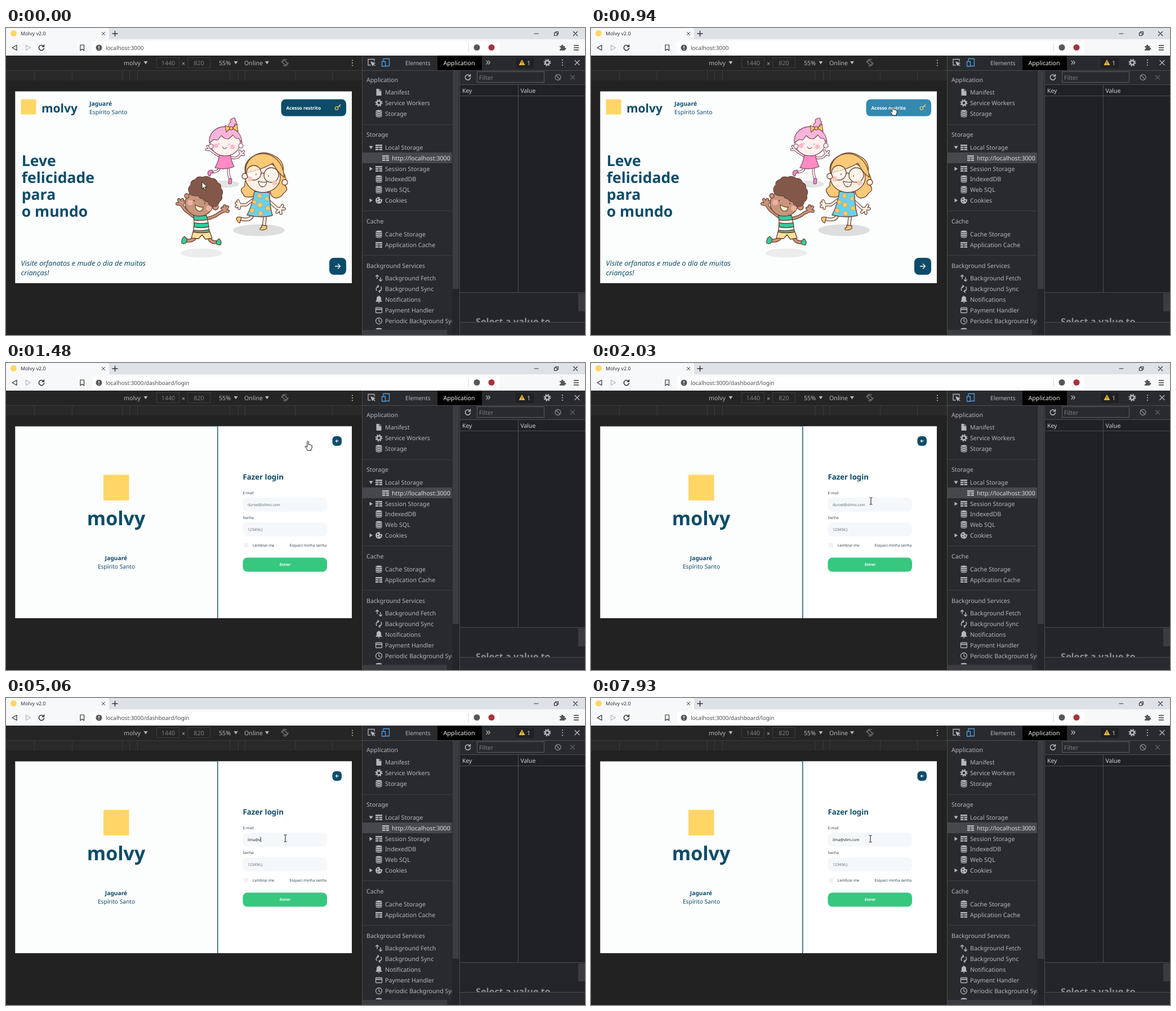
Recreate the animation shown at these times as an HTML page. Size 1028x545 px, loop 8000 ms.

```html
<!DOCTYPE html>
<html lang="pt">
<head>
<meta charset="utf-8">
<title>Login demo</title>
<style>
html, body { margin: 0; width: 100%; height: 100%; overflow: hidden; background: #222; }
svg { display: block; }
text { font: 10.65px "Noto Sans", "Open Sans", sans-serif; text-rendering: geometricPrecision; white-space: pre; }
.line { fill: none; stroke-linecap: round; stroke-linejoin: round; }
.light { fill: #b4b7bb; }
.navy { fill: #0d4c69; }
.bold { font-weight: 700; }
.brand { font-weight: 800; }
.small { font-size: 6.63px; }
.mid { text-anchor: middle; }
.ink { stroke: #6b432f; stroke-width: 1.3; stroke-linejoin: round; stroke-linecap: round; }
.plum { stroke: #75405a; stroke-width: 1.1; stroke-linejoin: round; stroke-linecap: round; }
</style>
</head>
<body>
<svg width="1028" height="545" viewBox="0 0 1028 545">
<defs>
  <g id="file"><path d="M-4.5-6H1L4.5-2.5V6h-9z"/><path d="M1-6v3.5h3.5" fill="none" stroke="#292a2d"/></g>
  <g id="gear" class="line" stroke="#b4b7bb"><circle r="3.5" stroke-width="2.6"/><circle r="5.5" stroke-width="2" stroke-dasharray="2.2 2.12" stroke-linecap="butt"/></g>
  <g id="disks"><path d="M-5.5-4.5a5.5 2 0 0 1 11 0v9a5.5 2 0 0 1-11 0z"/><path d="M-5.5-3.5q5.5 3 11 0m-11 3.5q5.5 3 11 0m-11 3.5q5.5 3 11 0" fill="none" stroke="#292a2d"/></g>
  <path id="grid" d="M-6-5H6v2.6H-6zM-6-1.3h5.4v2.6H-6zM.6-1.3H6v2.6H.6zM-6 2.4h5.4V5H-6zM.6 2.4H6V5H.6z"/>
  <g id="cookie"><circle r="6"/><g fill="#292a2d"><circle cx="-2" cy="-2" r="1.2"/><circle cx="2.5" cy="1" r="1.2"/><circle cx="-2" cy="2.5" r="1"/><circle cx="4" cy="-4.5" r="2.5"/></g></g>
  <path id="fetch" class="line" stroke="#b4b7bb" stroke-width="1.4" d="M-3 1v-6.5m-2.5 2.5 2.5-2.5 2.5 2.5M3-1v6.5M.5 3 3 5.5 5.5 3"/>
  <path id="sync" class="line" stroke="#b4b7bb" stroke-width="1.5" d="M-4 3a5 5 0 0 1 3.5-7.5M-2-6.5l2 2-2 2M4-3a5 5 0 0 1-3.5 7.5M2 6.5l-2-2 2-2"/>
  <path id="bell" d="M-5.5 4v-1l1.5-1.5v-3.5q0-3 3-3.7a1 1 0 0 1 2 0q3 .7 3 3.7v3.5L5.5 3v1zM-1.5 4.8h3a1.5 1.5 0 0 1-3 0z"/>
  <g id="card"><rect x="-5.5" y="-4.5" width="11" height="9" rx="1" fill="none" stroke="#b4b7bb" stroke-width="1.3"/><path d="M-5.5-2.5h11v2h-11z"/></g>
  <path id="clock" class="line" stroke="#b4b7bb" stroke-width="1.3" d="M-5.5 0a5.5 5.5 0 1 1 11 0a5.5 5.5 0 1 1-11 0M0-3v3.3l2.5 1.5"/>
  <path id="reload" class="line" stroke-width="1.5" d="M3.8-2.5a4.6 4.6 0 1 0 .7 3.5M4.5-5v3.2H1.3"/>
  <path id="close" class="line" stroke-width="1.2" d="M-3.5-3.5l7 7m0-7l-7 7"/>
  <path id="down" d="M-3.5-2.5h7L0 3z"/>
  <path id="dots" class="line" stroke="#b4b7bb" stroke-width="2.2" d="M0-4.5v0m0 4.5v0m0 4.5v0"/>
  <path id="bowLimbs" class="line" d="M380 228l-10-6-8-6m-6 0 6 0-4-6m4 6 1-6M399 230q9 2 13-1l5-5m-2-6 2 6 5-5m-5 5 5 1"/>
  <path id="glassesLimbs" class="line" d="M440 304l-14 10-11 0m-6-3 6 3-3-7m3 7-6 3m6-3-1 6M468 308l13 12 6 1m4-6-4 6 7 0m-7 0 1 8m-1-8-6 6"/>
  <path id="boyLimbs" class="line" d="M335 336l-17-13-7-10m-7-1 7 1-4-8m4 8 2-8m-2 8 5-4M358 338q12-2 20-9l10-5m6 1-6-1 5-6m-5 6 0-8m0 8-4-4"/>
  <clipPath id="sideClip"><path d="M633 75h159v460H633z"/></clipPath>
  <clipPath id="noteClip"><path d="M806 470h210v52H806z"/></clipPath>
</defs>

<!-- browser -->
<path fill="#dee1e6" d="M0 0h1028v21H0z"/>
<path fill="#f7f8f9" d="M0 21V4q0-4 4-4H179q4 0 4 4V20H1028V49H0z"/>
<path fill="#fff" d="M153 24H876V46H153z"/>
<circle cx="13.5" cy="9.5" r="5.5" fill="#ffd666"/>
<text x="26" y="13" style="font-size:9px" fill="#333">Molvy v2.0</text>
<g class="line" stroke="#333" stroke-width="1.2">
  <use href="#close" transform="translate(173 10) scale(.8)"/>
  <path stroke-width="1.5" d="M189 10h9m-4.5-4.5v9"/>
  <path d="M938 10h7M973.5 8.5h5v5h-5zM975.5 8.5v-2h5v5h-2"/>
  <use href="#close" x="1011" y="10"/>
  <path d="M19 30.5v9L11 35z"/><path stroke="#b5b7ba" d="M35.500 30.500v9L43.500 35z"/>
  <use href="#reload" x="63" y="35"/>
  <path d="M132 30h6.500v10l-3.200-2.500L132 40z"/>
  <path stroke="#d5d7da" d="M821 27v15"/>
  <path d="M1008.500 31h8m-8 4h8m-8 4h8" stroke-width="1.4"/>
</g>
<circle cx="165" cy="35" r="5.500" fill="#55585c"/>
<path stroke="#fff" stroke-width="1.400" d="M165 31.700v4m0 1.200v1.400"/>
<text id="address" x="177" y="38.500" style="font-size:9.95px" fill="#484b50"></text>
<circle cx="836" cy="34.500" r="5.500" fill="#54575c"/>
<circle cx="862" cy="34.500" r="5.500" fill="#a5343c"/>
<path fill="#55585c" d="M983 32h3a1.800 1.800 0 1 1 3.400 0h2.600v3a1.800 1.800 0 1 1 0 3.400V40h-9v-2.500a1.700 1.700 0 1 0 0-3.300z"/>

<!-- device toolbar -->
<path fill="#222" d="M0 49h632v496H0z"/>
<path fill="#252525" d="M0 49h632v26H0z"/>
<path fill="#292929" d="M0 75h632v18H0z"/>
<path fill="none" stroke="#3b3b3b" d="M0 75.500h632M50.500 76v17M117.500 76v17M206.500 76v17M219.500 76v17M233.500 76v17M397.500 76v17M412.500 76v17M424.500 76v17M513.500 76v17M579.500 76v17M267.500 52.500h40v18h-40zM322.500 52.500h40v18h-40z"/>
<g class="light">
  <text x="209" y="65.500">molvy</text><use href="#down" x="248" y="61.500"/>
  <text x="288" y="65.500" class="mid" opacity=".6">1440</text>
  <text x="315" y="67" class="mid">×</text>
  <text x="342.500" y="65.500" class="mid" opacity=".6">820</text>
  <text x="378" y="65.500">55%</text><use href="#down" x="408" y="61.500"/>
  <text x="423" y="65.500">Online</text><use href="#down" x="463.500" y="61.500"/>
</g>
<g class="line" stroke="#8d9095"><circle cx="495" cy="61.500" r="6" stroke-dasharray="12 6.850"/><rect x="492.500" y="57.500" width="5" height="8" rx="1" transform="rotate(-45 495 61.500)"/></g>
<use href="#dots" x="615" y="62"/>

<!-- developer tools -->
<path fill="#292a2d" d="M632 49h396v496H632z"/>
<path fill="#202124" d="M806 101h222v369H806z"/>
<path fill="#242528" d="M806 470h222v52H806z"/>
<path fill="#000" d="M766 49h79v26h-79z"/>
<path fill="#242528" d="M792 75h13v470h-13z"/>
<path fill="#3b3c3f" d="M793 76h11v387h-11zM633 536h150v9H633zM1016 471h12v32h-12z"/>
<path fill="none" stroke="#494c50" d="M632.500 49v496M633 75.500h395M805.500 75v470M806 100.500h222M806 120.500h222M909.500 101v369M806 469.500h222M806 522.500h222"/>
<path fill="none" stroke="#5b5d61" d="M836.500 77.500h119v19h-119z"/>
<path fill="none" stroke="#3c3e42" d="M633 171.500h159m-159 153h159m-159 79h159"/>
<path fill="#47484b" d="M633 221h159v19H633z"/>
<g class="light">
  <text x="709" y="65.500" style="font-size:10.3px">Elements</text>
  <text x="776.500" y="65.500" style="fill:#eee">Application</text>
  <text x="851.500" y="66" style="font-size:18px">»</text>
  <text x="840" y="92" opacity=".6">Filter</text>
  <text x="810" y="115" style="font-size:10.4px;fill:#d0d3d6">Key</text>
  <text x="913.500" y="115" style="font-size:10.4px;fill:#d0d3d6">Value</text>
  <text x="834" y="527" class="bold" clip-path="url(#noteClip)" style="font-size:16.3px;fill:#8b8e92">Select a value to</text>
</g>
<rect x="905" y="53" width="32" height="18" rx="2" fill="#202124"/>
<path fill="#f5bd38" d="M916 56l5.500 10h-11z"/><path stroke="#222" d="M916 59.500v3.500m0 1v1"/>
<text x="925" y="65.500" fill="#ccc">1</text>
<use href="#gear" x="961" y="61.500"/><use href="#dots" x="988" y="61.500"/>
<g class="line" stroke="#b4b7bb" stroke-width="1.300">
  <use href="#close" transform="translate(1014 61.500) scale(1.150)"/>
  <path d="M647 66h-4V55.500h11V59"/><path fill="#b4b7bb" d="M648 60l7 2.500-3 1.200-1.200 3zM652 64l3 3"/>
  <g stroke="#4f9fe8"><path d="M670 58v-3.500h10.500v13H674"/><rect x="667.500" y="59.500" width="6" height="8.500"/></g>
  <use href="#reload" x="820" y="87.500"/>
  <g stroke="#85888c"><circle cx="980" cy="87.500" r="5"/><path d="M976.500 84l7 7"/></g>
  <use href="#close" x="1006" y="87.500" stroke="#5d6064"/>
</g>
<g id="side" class="light" clip-path="url(#sideClip)"></g>

<!-- page -->
<path fill="#fcfefe" d="M16.300 112.500h597.700V453H16.300z"/>
<g id="home" class="navy">
  <path fill="#ffd666" d="M26.500 126.500h27v27h-27z"/>
  <text x="63" y="150" class="brand" style="font-size:21px">molvy</text>
  <text x="148" y="138" class="bold" style="font-size:10.4px">Jaguaré</text>
  <text x="148" y="153" style="font-size:10.4px">Espírito Santo</text>
  <g id="headline"></g>
  <text x="26.500" y="422" style="font-size:12.6px;font-style:italic">Visite orfanatos e mude o dia de muitas</text>
  <text x="26.500" y="439" style="font-size:12.6px;font-style:italic">crianças!</text>
  <rect id="access" x="488.500" y="126.500" width="115.500" height="30" rx="8"/>
  <text x="497.500" y="144.500" class="bold" style="font-size:8.29px" fill="#fff">Acesso restrito</text>
  <g class="line" stroke="#ffd666" stroke-width="1.100"><circle cx="587" cy="142.500" r="2.800"/><path d="M589 140.500l5-4.500m-2.300 2 1.800 1.800"/></g>
  <rect x="574" y="408" width="30" height="30" rx="8"/>
  <path class="line" stroke="#fff" stroke-width="1.300" d="M584.500 423h9m-4-4 4 4-4 4"/>

  <!-- girl with a bow -->
  <ellipse cx="390" cy="277" rx="24" ry="6.500" fill="#e3e3e3"/>
  <g class="plum">
    <path fill="none" d="M379 248q-2 8-14 8m30-8q-1 12 3 20" stroke-width="4.500"/>
    <path fill="none" stroke="#fff1ee" stroke-width="2.600" d="M379 248q-2 8-14 8m30-8q-1 12 3 20"/>
    <path fill="#ff8ac4" d="M366 252l-5 1q-4 3-2 8l3 2 2-5 4-2zM396 267l5 1-1 8q-4 2-5-1z"/>
    <use href="#bowLimbs" stroke-width="4.600"/><use href="#bowLimbs" stroke="#fff1ee" stroke-width="2.600"/>
    <path fill="#ff8ac4" d="M379 223h19q2 14 7 23-17 7-34 2 7-12 8-25z"/>
    <path fill="#f8b5d9" d="M395 180q-1-11 4-13-3-4 2-6 7-4 6 3 5 4-1 7-1 7-7 10z"/>
    <ellipse cx="389" cy="203" rx="27" ry="24" fill="#fff1ee"/>
    <circle cx="364" cy="210" r="4" fill="#fff1ee"/><circle cx="417" cy="209" r="4" fill="#fff1ee"/>
    <path fill="#f8b5d9" d="M361 204c-3-37 56-40 58 0l-6-8-5 0-5-6-8 7-7-1-6-5-6 8-7-1z"/>
    <path fill="#ffca58" d="M399 177l-10-4 2 12zM402 178l8-8 2 14z"/><circle cx="400" cy="178" r="3" fill="#ffca58"/>
    <path fill="none" d="M384 211q4 6 8 1M378 205v1M396 206v1"/>
  </g>
  <g fill="#fbb8cd"><circle cx="373" cy="209" r="4"/><circle cx="402" cy="211" r="4"/></g>

  <!-- girl with glasses -->
  <ellipse cx="449" cy="359" rx="46" ry="10.500" fill="#dedede"/>
  <g class="ink">
    <path fill="#fbc977" d="M429 266q-13-23 9-38 20-13 40 0 17 9 14 28 9 14 3 23 8 8-2 14-4 8-14 9-9-1-10-13l-27-2q2 14-10 13-9 1-11-5-8-9 3-14-1-10 5-15z"/>
    <path fill="none" stroke-width="6.500" d="M438 331q-3 12-20 8M460 333l-2 18"/>
    <path fill="none" stroke="#fff1e6" stroke-width="4" d="M438 331q-3 12-20 8M460 333l-2 18"/>
    <path fill="#fbc977" d="M418 336q-7-2-9 2 1 7 6 8zM454 350l9 1 0 5q-6 4-12 2 0-4 3-4z"/>
    <use href="#glassesLimbs" stroke-width="5.600"/><use href="#glassesLimbs" stroke="#fff1e6" stroke-width="3.200"/>
    <path fill="#69d0ef" d="M441 290l27 2q0 23 5 41-22 5-45-1 10-19 13-42z"/>
    <ellipse cx="456" cy="265" rx="31" ry="27" fill="#fff1e6"/>
    <circle cx="424" cy="263" r="5" fill="#fff1e6"/><circle cx="495" cy="274" r="5" fill="#fff1e6"/>
    <path fill="#fbc977" d="M425 257c-1-47 66-46 69 8q-12-8-20-25-23 13-49 17z"/>
    <g fill="#fff8f0" fill-opacity=".7"><circle cx="440" cy="257" r="13"/><circle cx="471" cy="261" r="13"/></g>
    <path fill="none" d="M453 258q3-2 5 1M444 259v1.500M466 262v1.500"/>
    <path fill="#fff" d="M448 272q8 3 15 1-1 9-8 9-6-1-7-10z"/>
  </g>
  <g fill="#ffcb62" stroke="#b8974b" stroke-width=".7"><circle cx="450" cy="298" r="4"/><circle cx="463" cy="303" r="3.500"/><circle cx="441" cy="309" r="3.500"/><circle cx="451" cy="314" r="4.500"/><circle cx="465" cy="320" r="4"/><circle cx="437" cy="324" r="4"/><circle cx="452" cy="329" r="4"/></g>
  <g fill="#f9c6bd"><circle cx="433" cy="268" r="4.500"/><circle cx="477" cy="275" r="4.500"/></g>

  <!-- boy -->
  <ellipse cx="347" cy="399.500" rx="37" ry="8" fill="#ececec"/>
  <g class="ink">
    <path fill="none" stroke-width="6.500" d="M336 372q-5 7-16 5M360 372q4 10 15 8"/>
    <path fill="none" stroke="#c9957c" stroke-width="4" d="M336 372q-5 7-16 5M360 372q4 10 15 8"/>
    <path fill="#2bd1a0" d="M321 374l-4-4q-6 3-5 12 6 3 9-3zM374 378l4-4q6 4 3 11-6 1-8-3z"/>
    <use href="#boyLimbs" stroke-width="6"/><use href="#boyLimbs" stroke="#c9957c" stroke-width="3.600"/>
    <path fill="#fff" d="M333 333h23q4 15 5 31l-29 0q3-16 1-31z"/>
    <path fill="#2bd1a0" d="M333 333h23l2 7q-13 3-24 1zM334 346q13 2 25 0l1 7q-14 3-26 0zM333 359q14 2 28-1v6h-29z"/>
    <path fill="#ffe199" d="M332 362q15 3 30 0l4 11-12 2-6-8-6 7-13-1z"/>
    <ellipse cx="343" cy="311" rx="25" ry="23" fill="#c9957c"/>
    <circle cx="321" cy="298" r="4" fill="#c9957c"/><circle cx="372" cy="318" r="5" fill="#c9957c"/>
    <path fill="#83584a" stroke="#6f4a3d" d="M326 294q-5-10 2-15-1-8 8-10 4-7 13-4 8-4 15 2 9-1 11 7 8 3 6 10 6 6 2 13 2 8-4 11-2 9-11 9-8 1-9-8-8-1-9-6-7 0-8-5-11 1-16-4z"/>
    <path fill="#fffbd4" d="M336 314q8 5 14 4-1 8-8 7-6-2-6-11z"/>
    <path fill="none" stroke-width="2" d="M334 306v1M353 311v1"/>
  </g>
  <g fill="#eab3a2"><circle cx="327" cy="310" r="5"/><circle cx="360" cy="320" r="5"/></g>
</g>

<g id="login">
  <path fill="#fff" d="M376 112.500h238V453H376z"/>
  <path fill="#23627b" d="M375 112.500h1.600V453H375z"/>
  <g id="brand" class="navy mid">
    <path fill="#ffd666" d="M173 198.500h45.500V244H173z"/>
    <text x="195.500" y="287.500" class="brand" style="font-size:34px">molvy</text>
  </g>
  <g id="place" class="navy mid"><text x="195.500" y="301" class="bold" style="font-size:10.2px">Jaguaré</text><text x="196" y="315.500" style="font-size:10.2px">Espírito Santo</text></g>
  <rect x="579.500" y="130" width="16.500" height="17" rx="6" class="navy"/>
  <path class="line" stroke="#fff" stroke-width="1.100" d="M590.500 138.500h-5m2.200-2.200-2.200 2.200 2.200 2.200"/>
  <text x="420.500" y="206.500" class="navy bold" style="font-size:13.27px">Fazer login</text>
  <g fill="#f5f8fa"><rect x="420.500" y="239" width="149.500" height="25" rx="8"/><rect x="420.500" y="283" width="149.500" height="25" rx="8"/><rect x="422" y="319.500" width="8.500" height="8" rx="1.500" fill="#f0f3f5"/></g>
  <rect x="420.500" y="345.500" width="149.500" height="25" rx="8" fill="#37c77f"/>
  <g fill="#2d4652">
    <text x="420.500" y="232.500" class="small">E-mail</text><text x="420.500" y="277" class="small">Senha</text>
    <text id="email" x="429" y="253.500" class="small"></text>
    <text x="429" y="298" class="small" fill="#5c6a72">123456;)</text>
    <text x="438" y="326" class="small">Lembrar-me</text><text x="503.500" y="326" class="small">Esqueci minha senha</text>
  </g>
  <text x="495.500" y="360" class="small bold mid" style="font-style:italic" fill="#fff">Entrar</text>
  <path id="caret" d="M.500 246.500v9.500" stroke="#111" stroke-width=".9"/>
</g>
<g id="status"><path fill="#dee1e6" d="M17 436H211q4 0 4 4v13H17z"/><text x="21" y="448" style="font-size:8.45px" fill="#4a4d51">Waiting for localhost...</text></g>

<g id="cursor" stroke="#111" stroke-linejoin="round" fill="#fff">
  <path id="arrow" stroke-width=".9" d="M0 0v12.500l2.900-2.700 2 4.700 2-.9-2-4.500h4z"/>
  <path id="hand" d="M-1.300 1.300a1.300 1.300 0 0 1 2.600 0v5l1-.7 1.400.7 1 0 1.300.8 1.200.5v4l-1.400 2.600v2h-6.600l-1-2.600-3-3.800c-.6-1 .8-1.800 1.700-1l1.800 1.600z"/>
  <path id="beam" fill="none" d="M-2.500-6h2l.5.500.5-.5h2M0-5.500v11M-2.500 6h2l.5-.5.5.5h2"/>
</g>
</svg>
<script>
const $ = id => document.getElementById(id);
const show = (id, on) => $(id).style.display = on ? '' : 'none';

const rows = [
  [92, 'Application'], [114, 'Manifest', 'file'], [133, 'Service Workers', 'gear'], [152, 'Storage', 'disks'],
  [189, 'Storage'], [212, 'Local Storage', 'grid', 0], [231, 'http://localhost:3000', 'grid'],
  [250, 'Session Storage', 'grid', -90], [268, 'IndexedDB', 'disks'], [287, 'Web SQL', 'disks'], [306, 'Cookies', 'cookie', -90],
  [343, 'Cache'], [366, 'Cache Storage', 'disks'], [385, 'Application Cache', 'grid'],
  [422, 'Background Services'], [444, 'Background Fetch', 'fetch'], [463, 'Background Sync', 'sync'],
  [482, 'Notifications', 'bell'], [501, 'Payment Handler', 'card'], [520, 'Periodic Background Sync', 'clock'], [539, 'Push Messaging', 'disks']
];
$('side').innerHTML = rows.map(([y, label, icon, turn]) => {
  const indent = label.startsWith('http') ? 12 : 0;
  return `<text x="${(icon ? 673 : 640) + indent}" y="${y + 4}"${indent ? ' fill="#dcdee0"' : ''}>${label}</text>` +
    (icon ? `<use href="#${icon}" x="${662 + indent}" y="${y}"/>` : '') +
    (turn === undefined ? '' : `<use href="#down" transform="translate(648 ${y}) rotate(${turn})"/>`);
}).join('');
$('headline').innerHTML = ['Leve', 'felicidade', 'para', 'o mundo']
  .map((s, i) => `<text x="27.8" y="${245 + i * 29.9}" class="bold" style="font-size:26.54px">${s}</text>`).join('');

const typed = 'ilma@vlim.com';
const focusTime = 2280;
const keyTimes = [3040, 3190, 3340, 3510, 4510, 5060, 5210, 5380, 5680, 6300, 6770, 7000, 7170];
const clamp = x => Math.max(0, Math.min(1, x));
const mix = (a, b, p) => a + (b - a) * p;
const ease = p => p * p * (3 - 2 * p);
// Share of a move done, in n visible jumps from the first time to the last
const stepped = (t, from, to, n) => t < from ? 0 : clamp((Math.floor((t - from) / (to - from) * (n - 1) + 1e-6) + 1) / n);

// Pointer moves: first and last jump, number of jumps, end point
const moves = [
  [80, 700, 9, 530, 130], [870, 940, 2, 535.5, 139],
  [1730, 2030, 5, 497, 245], [2110, 2340, 4, 496, 249], [7930, 7931, 1, 496, 250]
];
function pointer(t) {
  let x = 348, y = 273;
  for (const [from, to, n, endX, endY] of moves) {
    const p = ease(stepped(t, from, to, n));
    x = mix(x, endX, p);
    y = mix(y, endY, p);
  }
  return [x, y];
}

function draw() {
  const t = performance.now() % 8000;
  const login = t >= 1110, loaded = t >= 1260;
  show('home', !login);
  show('login', login);
  show('brand', loaded);
  $('address').textContent = 'localhost:3000' + (login ? '/dashboard/login' : '');
  $('place').setAttribute('transform', `translate(0 ${loaded ? 49 : 0})`);
  $('status').style.opacity = login ? 1 - stepped(t, 1260, 1480, 4) : 0;

  const hover = stepped(t, 545, 700, 3);
  $('access').style.fill = `rgb(${mix(13, 51, hover)},${mix(76, 137, hover)},${mix(105, 176, hover)})`;

  const count = keyTimes.filter(k => k <= t).length;
  const email = $('email');
  email.textContent = count ? typed.slice(0, count) : 'durvel@vlimo.com';
  email.style.fill = count ? '#222' : '#5c6a72';
  const lastKey = count ? keyTimes[count - 1] : focusTime;
  show('caret', t >= focusTime && (t - lastKey) % 1060 < 530);
  if (login) $('caret').setAttribute('transform', `translate(${429 + (count && email.getComputedTextLength())} 0)`);

  const [x, y] = pointer(t);
  const kind = t < 1730 ? (x > 488 && y < 157 ? 'hand' : 'arrow') : (y > 239 ? 'beam' : 'arrow');
  for (const id of ['arrow', 'hand', 'beam']) show(id, id === kind);
  $('cursor').setAttribute('transform', `translate(${Math.round(x)} ${Math.round(y)})`);
  requestAnimationFrame(draw);
}
draw();
</script>
</body>
</html>
```
